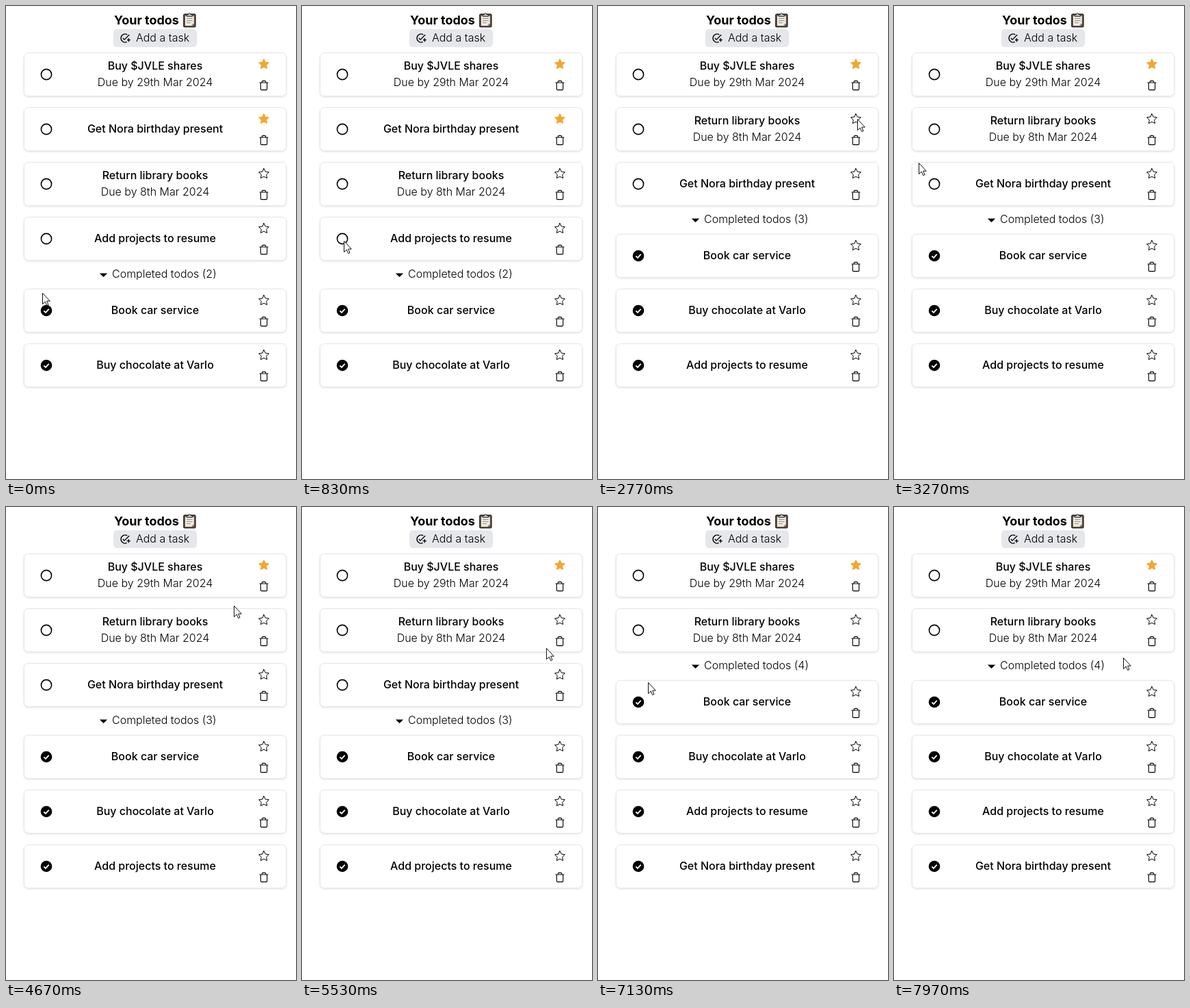
An HTML page that plays this animation: 424x691 px, repeating every 8 s.

```html
<!DOCTYPE html>
<html lang="en">
<head>
<meta charset="utf-8">
<title>Your todos</title>
<style>
  html, body { margin: 0; width: 100%; height: 100%; overflow: hidden; background: #fff; }
  svg { display: block; }
  text { font-family: Inter, Roboto, sans-serif; font-size: 16px; text-anchor: middle; fill: #000; }
  .title { font-weight: 450; }
  .light { font-weight: 350; }
  .heading { font-size: 18px; font-weight: 700; text-anchor: start; }
  .start { text-anchor: start; }
  .card { fill: #fff; stroke: #e5e7eb; filter: drop-shadow(0 1px 1.5px rgba(0, 0, 0, .12)); }
  .line { fill: none; stroke: #000; stroke-linejoin: round; stroke-linecap: round; }
  .star { fill: #f2a72e; stroke: #f2a72e; stroke-linejoin: round; }
</style>
</head>
<body>
<svg width="424" height="691" viewBox="0 0 424 691">
  <text class="heading" x="158" y="27">Your todos</text>
  <g stroke="#29231f">
    <rect x="259.8" y="12" width="17.2" height="18.6" rx="1.4" fill="#6d563f" stroke-width="1.3"/>
    <path d="M262 14.5h12.8v11.2l-3 3H262z" fill="#f1eee8" stroke="none"/>
    <path d="M274.8 25.7h-3v3z" fill="#b9b2a8" stroke="none"/>
    <path d="M264 18.5h8.6M264 21.5h8.6M264 24.5h6" stroke="#8c8883"/>
    <path d="M264.4 15.3v-2.6h2.2q.2-2.2 1.9-2.2t1.9 2.2h2.2v2.6z" fill="#b8b8b8" stroke-width=".9"/>
  </g>
  <rect x="157" y="34" width="122" height="26" rx="5" fill="#e5e7eb"/>
  <path transform="translate(166 39) scale(.667)" fill="none" stroke="#000" stroke-width="2"
    d="M17 4.5A9 9 0 1 0 16 20.1M7 11.6l3.6 3.6L21.3 4.5M16 16h8M20 12v8"/>
  <text class="light start" x="190" y="52">Add a task</text>
  <g id="list"></g>
  <path id="arrow" fill="#fff" stroke="#111" stroke-linejoin="round"
    d="M.5 .5V16.5L4.2 13 6.7 18.5 9 17.5 6.6 12.1H11.3Z"/>
  <path id="beam" fill="none" stroke="#000"
    d="M-2.5 -6.5H-.5L.5 -5.5 1.5 -6.5H3.5M.5 -5.5V5.5M-2.5 6.5H-.5L.5 5.5 1.5 6.5H3.5"/>
</svg>
<script>
const LOOP = 8000, TOP = 68, PITCH = 80;
const $ = id => document.getElementById(id);

const todos = {
  shares: ['Buy $JVLE shares', 'Due by 29th Mar 2024'],
  gift: ['Get Nora birthday present'],
  books: ['Return library books', 'Due by 8th Mar 2024'],
  resume: ['Add projects to resume'],
  car: ['Book car service'],
  sweets: ['Buy chocolate at Varlo']
};

const state = { open: ['shares', 'gift', 'books', 'resume'], done: ['car', 'sweets'], starred: ['shares', 'gift'] };
const without = (list, id) => list.filter(item => item !== id);

const complete = id => s => ({ ...s, open: without(s.open, id), done: [...s.done, id] });
const unstar = id => s => ({ ...s, open: [...without(s.open, id), id], starred: without(s.starred, id) });

const clicks = [
  { at: 970, act: complete('resume') },
  { at: 2770, act: unstar('gift') },
  { at: 7000, act: complete('gift') }
];

// Pointer moves: each a curve from the last rest point, bent towards "via"
const smooth = u => u * u * (3 - 2 * u);
const dash = u => 1 - (1 - u) ** 3;
const home = [53, 419];
const moves = [
  { from: 30, until: 790, via: [-1, 606], to: [61, 343], ease: smooth },
  { from: 970, until: 1730, via: [200, 380], to: [339, 362], ease: smooth },
  { from: 1730, until: 2600, via: [375, 250], to: [379, 165], ease: dash },
  { from: 2870, until: 3270, via: [-72, 394], to: [36, 229], ease: smooth },
  { from: 4270, until: 5100, via: [330, 189], to: [341, 127], ease: dash },
  { from: 5130, until: 5900, via: [350, 200], to: [382, 277], ease: smooth },
  { from: 6070, until: 6870, via: [124, 251], to: [61, 254], ease: smooth },
  { from: 7000, until: 7800, via: [140, 270], to: [285, 274], ease: smooth },
  { from: 7800, until: 7970, via: [320, 260], to: [335, 220], ease: smooth }
];

function pointer(t) {
  let start = home;
  for (const { from, until, via, to, ease } of moves) {
    if (t < from) break;
    if (t < until) {
      const u = ease((t - from) / (until - from)), v = 1 - u;
      return start.map((p, k) => v * v * p + 2 * u * v * via[k] + u * u * to[k]);
    }
    start = to;
  }
  return start;
}

const star = (outer, inner) => Array.from({ length: 10 }, (_, i) => {
  const r = i % 2 ? inner : outer, a = (i * 36 - 90) * Math.PI / 180;
  return (r * Math.cos(a)).toFixed(2) + ',' + (r * Math.sin(a)).toFixed(2);
}).join(' ');
const starPoints = star(7.8, 3.9);

const label = (cls, y, str) => `<text class="${cls}" x="218" y="${y}">${str}</text>`;

function card(id, y, done, starred) {
  const [title, due] = todos[id];
  const mark = done
    ? '<circle cx="59" cy="32" r="8.3"/><path d="M55.4 32.3l2.6 2.6 4.7-5.2" fill="none" stroke="#fff" stroke-width="1.8"/>'
    : '<circle class="line" cx="59" cy="32" r="7.6" stroke-width="1.6"/>';
  return `<g transform="translate(0 ${y})">
    <rect class="card" x="26.5" y=".5" width="383" height="63" rx="6"/>
    ${mark}
    ${due ? label('title', 25, title) + label('light', 49, due) : label('title', 37, title)}
    <polygon class="${starred ? 'star' : 'line'}" transform="translate(377 17.2)" points="${starPoints}"/>
    <path class="line" transform="translate(369 40) scale(.667)" stroke-width="1.7"
      d="M3 6h18M19 6v14a2 2 0 0 1-2 2H7a2 2 0 0 1-2-2V6M8 6V4a2 2 0 0 1 2-2h4a2 2 0 0 1 2 2v2"/>
  </g>`;
}

// Draws the list and returns the boxes of its text
function draw({ open, done, starred }) {
  const end = TOP + PITCH * open.length;
  $('list').innerHTML =
    open.map((id, i) => card(id, TOP + PITCH * i, false, starred.includes(id))).join('') +
    `<path d="M136.8 ${end + 2.5}h11.4l-5.7 5.5z"/>` +
    `<text class="light start" x="155" y="${end + 9}">Completed todos (${done.length})</text>` +
    done.map((id, i) => card(id, end + 25 + PITCH * i, true, false)).join('');
  return [...$('list').querySelectorAll('text')].map(el => el.getBoundingClientRect());
}

let drawn, textBoxes = [];

function render(t) {
  const past = clicks.filter(c => t >= c.at);
  if (past.length !== drawn) {
    drawn = past.length;
    textBoxes = draw(past.reduce((s, c) => c.act(s), state));
  }
  const [x, y] = pointer(t).map(Math.round);
  const overText = textBoxes.some(b => x > b.left && x < b.right && y > b.top && y < b.bottom);
  for (const id of ['arrow', 'beam']) {
    $(id).setAttribute('transform', `translate(${x} ${y})`);
    $(id).style.display = overText === (id === 'beam') ? '' : 'none';
  }
}

const start = performance.now();
function tick() {
  render((performance.now() - start) % LOOP);
  requestAnimationFrame(tick);
}
tick();
</script>
</body>
</html>
```
